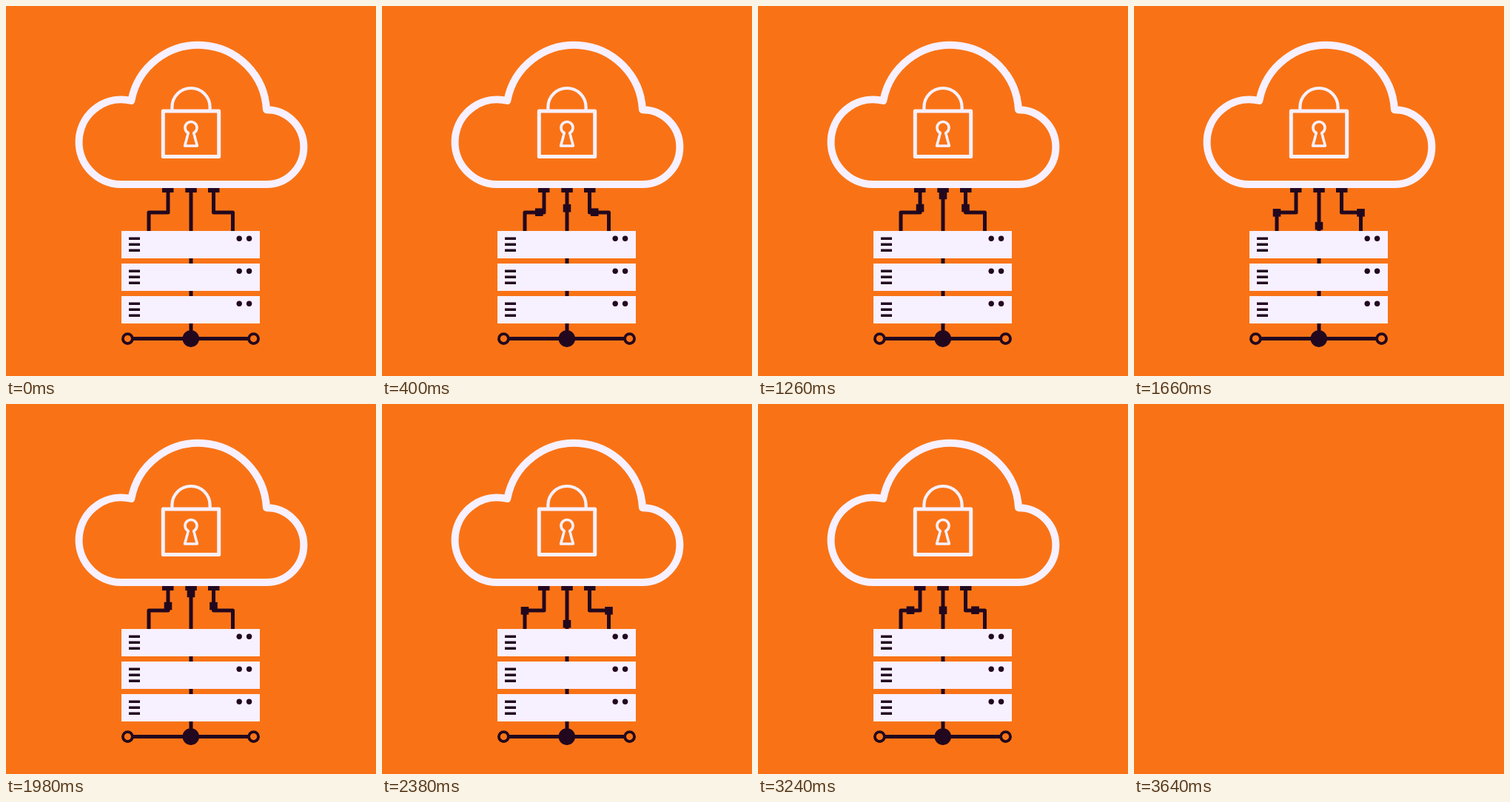
These frames come from a looping animation (500x500 px, 3.66 s). An HTML page:

```html
<!DOCTYPE html>
<html>
<head>
<meta charset="utf-8">
<style>
  html, body { margin: 0; width: 100%; height: 100%; overflow: hidden; background: #f97316; }
  svg { display: block; width: 100%; height: 100%; }
</style>
</head>
<body>
<svg viewBox="0 0 500 500" fill="none" stroke-linejoin="round">
  <defs>
    <g id="server">
      <path fill="#f7f0ff" d="M156 304h187v37h-187z"/>
      <path stroke="#22081f" stroke-width="3.6" d="M166 314.2h15M166 322.2h15M166 330.2h15"/>
      <g fill="#22081f">
        <circle cx="315.2" cy="314.2" r="3.7"/>
        <circle cx="328.6" cy="314.2" r="3.7"/>
      </g>
    </g>
  </defs>
  <g id="scene">
    <g stroke="#22081f" stroke-width="5">
      <path d="M219 248V279H193V306M250 248V450M280.5 248V279H306.5V306"/>
      <path stroke-width="6" d="M211 249h15.5M242.3 249h15.5M273 249h15.5"/>
      <path d="M170.5 449.5H328.5"/>
      <g stroke-width="3.8">
        <circle cx="164.4" cy="449.6" r="6.5" fill="#f97316"/>
        <circle cx="334.6" cy="449.6" r="6.5" fill="#f97316"/>
      </g>
    </g>
    <circle cx="249.8" cy="449.6" r="11.3" fill="#22081f"/>
    <g id="packets" fill="#22081f">
      <path d="M-5.3-5.3h10.6v10.6h-10.6z"/>
      <path d="M-5.3-5.3h10.6v10.6h-10.6z"/>
      <path d="M-5.3-5.3h10.6v10.6h-10.6z"/>
    </g>
    <use href="#server"/>
    <use href="#server" y="44"/>
    <use href="#server" y="88"/>
    <g stroke="#f7f0ff">
      <path stroke-width="10" d="M169.3 128A57.3 57.3 0 1 0 155 241H352A50.4 50.4 0 1 0 352 140.2A92.2 92.2 0 0 0 169.3 128Z"/>
      <path stroke-width="5" d="M212.3 142h75.4v61.6h-75.4z"/>
      <path stroke-width="4.2" d="M224.4 141V136.6a25.6 25.6 0 0 1 51.2 0V141"/>
      <path stroke-width="3.6" d="M246.3 171.6L241.6 189H258.4L253.7 171.6A8 8 0 1 0 246.3 171.6Z"/>
    </g>
  </g>
</svg>
<script>
  const LOOP = 3660, BLANK_AT = 3640, TRIP = 720;
  const scene = document.getElementById('scene');
  const packets = document.getElementById('packets').children;

  // Stops are spread evenly over the trip, with an ease in and out of each.
  const routes = [
    [[193, 311.5], [193, 278.7], [219, 278.7], [219, 242.5]],
    [[250, 312], [250, 245.5]],
    [[306.5, 311.5], [306.5, 278.7], [280.5, 278.7], [280.5, 242.5]]
  ];

  const ease = p => p * p * (3 - 2 * p);

  function along(stops, progress) {
    const pos = progress * (stops.length - 1);
    const i = Math.floor(pos), p = ease(pos - i);
    return stops[i].map((v, axis) => v + (stops[i + 1][axis] - v) * p);
  }

  function draw(now) {
    const t = now % LOOP;
    scene.style.visibility = t < BLANK_AT ? 'visible' : 'hidden';
    routes.forEach((stops, i) => {
      const [x, y] = along(stops, t % TRIP / TRIP);
      packets[i].setAttribute('transform', `translate(${x} ${y})`);
    });
  }

  let start;
  function tick(now) {
    start ??= now;
    draw(now - start);
    requestAnimationFrame(tick);
  }
  draw(0);
  requestAnimationFrame(tick);
</script>
</body>
</html>
```
